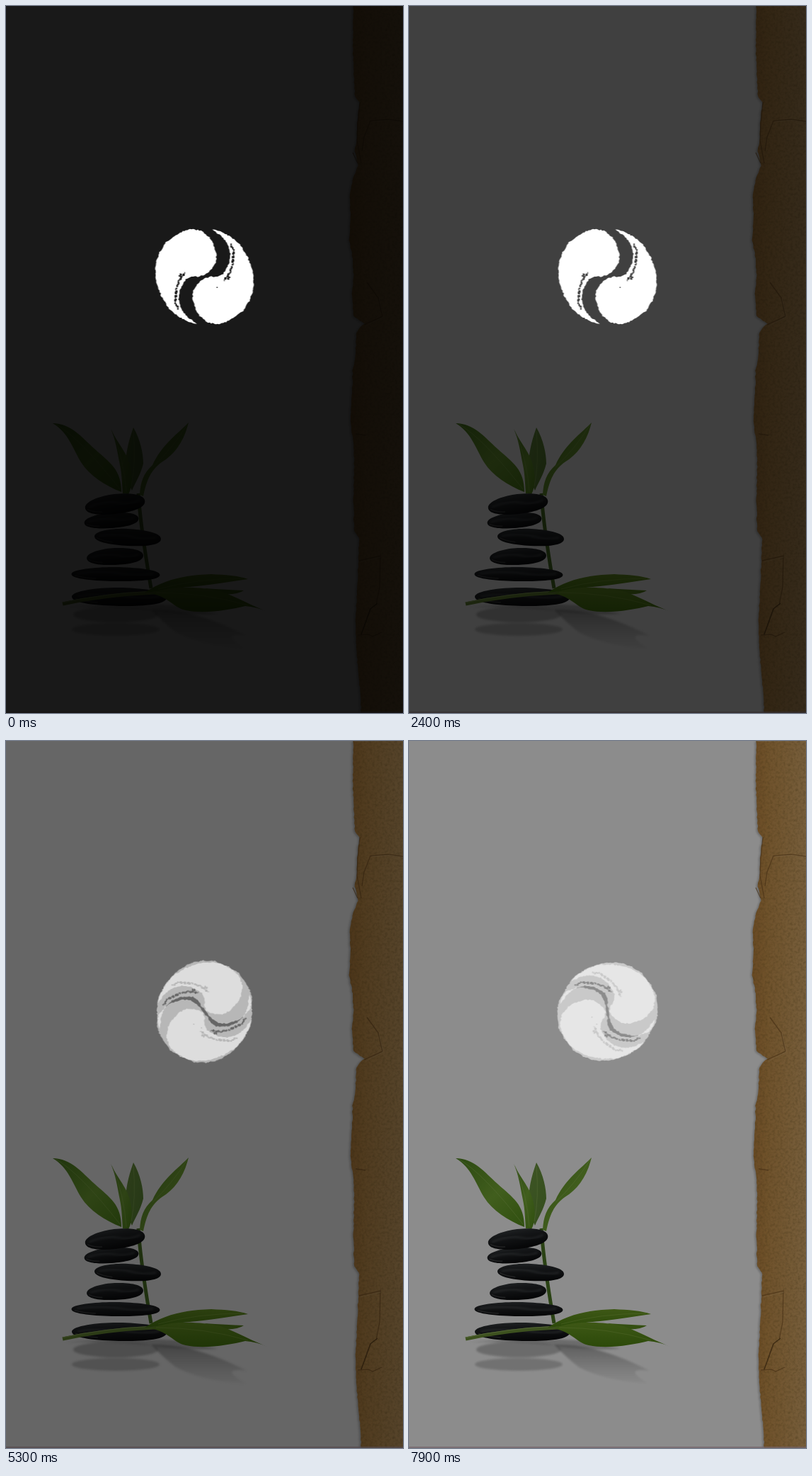
An HTML page with a canvas for the animation above (8000 ms loop, 561 px wide and 998 px high).

```html
<!DOCTYPE html>
<html lang="en">
<head>
<meta charset="utf-8">
<title>Stones and spinner</title>
<style>
  html, body { margin: 0; width: 100%; height: 100%; overflow: hidden; background: #1a1a1a; }
  #stage { position: relative; width: 561px; height: 998px; overflow: hidden; background: #fff; }
  #stage > * { position: absolute; left: 0; top: 0; display: block; }
  #dim { width: 561px; height: 998px; background: #000; opacity: .9; }
</style>
</head>
<body>
<div id="stage">
  <svg id="scene" width="561" height="998" viewBox="0 0 561 998">
    <defs>
      <linearGradient id="paperFill">
        <stop offset="0" stop-color="#bd8540"/>
        <stop offset=".3" stop-color="#cb9650"/>
        <stop offset="1" stop-color="#d8ab6c"/>
      </linearGradient>
      <linearGradient id="stoneFill" x1="0" y1="0" x2=".25" y2="1">
        <stop offset="0" stop-color="#3c4144"/>
        <stop offset=".35" stop-color="#26292c"/>
        <stop offset="1" stop-color="#0c0d0f"/>
      </linearGradient>
      <linearGradient id="leafDark" x1="0" y1="0" x2="1" y2="1">
        <stop offset="0" stop-color="#4f8420"/>
        <stop offset=".55" stop-color="#76aa35"/>
        <stop offset="1" stop-color="#568f1c"/>
      </linearGradient>
      <linearGradient id="leafLight" x1="0" y1="0" x2="1" y2="1">
        <stop offset="0" stop-color="#719a42"/>
        <stop offset="1" stop-color="#5e8c35"/>
      </linearGradient>
      <linearGradient id="leafLow" x1="0" y1="0" x2="0" y2="1">
        <stop offset="0" stop-color="#709f27"/>
        <stop offset="1" stop-color="#4f8511"/>
      </linearGradient>
      <linearGradient id="fade" x1="0" y1="0" x2="0" y2="1">
        <stop offset="0" stop-color="#777" stop-opacity=".65"/>
        <stop offset="1" stop-color="#aaa" stop-opacity=".1"/>
      </linearGradient>
      <filter id="soft"><feGaussianBlur stdDeviation="1.6"/></filter>
      <filter id="grain" x="0" y="0" width="1" height="1">
        <feTurbulence type="fractalNoise" baseFrequency=".28" numOctaves="3" seed="4"/>
        <feColorMatrix values="0 0 0 0 .2  0 0 0 0 .12  0 0 0 0 .02  .9 0 0 0 -.34"/>
        <feComposite in2="SourceAlpha" operator="in" result="dust"/>
        <feMerge><feMergeNode in="SourceGraphic"/><feMergeNode in="dust"/></feMerge>
      </filter>
    </defs>

    <path id="paperShade" fill="#777" opacity=".45" filter="url(#soft)" transform="translate(-2 1)"/>
    <path id="paper" fill="url(#paperFill)" filter="url(#grain)"/>
    <g fill="none" stroke="#7d5424" stroke-width="1.3" opacity=".65">
      <path d="M500 136L497 165 496 190 502 222M503 205L506 185 515 162 540 160 561 163"/>
      <path d="M490 207L497 222M510 390L526 412 532 438 506 450M494 604L508 606"/>
      <path d="M499 783L529 776 528 820 523 846M497 888L512 887 518 890 531 884"/>
      <path d="M525 843L515 851 502 887" stroke="#4b3010" stroke-width="1.6"/>
    </g>
    <path d="M517 163L542 161 561 164M527 413L533 439 508 452M501 785L530 778" fill="none" stroke="#e8c48c" opacity=".35"/>

    <g filter="url(#soft)">
      <ellipse cx="155" cy="859" rx="60" ry="11" fill="#888" opacity=".5"/>
      <ellipse cx="155" cy="880" rx="62" ry="9" fill="#888" opacity=".42"/>
      <path d="M85 849Q160 842 240 846L300 858Q260 860 225 856Q150 846 85 849Z" fill="#888" opacity=".5"/>
      <path d="M205 852Q265 850 340 889Q300 884 338 907Q280 904 240 884Q222 870 205 852Z" fill="url(#fade)"/>
    </g>

    <path d="M187 688Q190 735 205 822" fill="none" stroke="#4d7825" stroke-width="5"/>
    <path d="M180 595C190 612 194 632 194 646C190 662 183 672 178 684C168 662 164 640 180 595Z" fill="url(#leafLight)"/>
    <path d="M66 589C92 589 107 609 125 625C147 645 163 654 163 686C140 677 118 663 106 644C94 624 88 602 66 589Z" fill="url(#leafDark)"/>
    <path d="M148 597C160 622 174 632 177 658C179 674 176 684 173 689L165 688C164 676 164 662 161 648C157 628 155 612 148 597Z" fill="url(#leafDark)"/>
    <path d="M258 588C252 612 240 632 220 644C205 655 199 668 194 692L189 690C190 672 194 660 207 648C220 620 240 606 258 588Z" fill="url(#leafDark)"/>
    <path d="M70 590Q105 610 161 682M150 600Q167 640 170 686M180 600Q184 645 177 678M256 591Q234 626 207 651" fill="none" stroke="#a9ce6b" stroke-width=".8" opacity=".5"/>

    <g id="stones"></g>

    <path d="M80 844Q140 831 210 828L240 823" fill="none" stroke="#6f9338" stroke-width="5"/>
    <path d="M80 842Q140 829 210 826" fill="none" stroke="#98b765" stroke-width="1.2"/>
    <path d="M196 828C225 808 258 803 290 802C310 803 328 804 342 809C318 812 300 816 270 819C240 821 220 826 196 828Z" fill="url(#leafLow)"/>
    <path d="M280 822Q312 824 336 825Q326 832 304 830Z" fill="#5f8f1f"/>
    <path d="M205 829C235 817 275 820 303 826C330 836 350 848 372 856Q354 848 338 847C315 853 275 859 250 852C235 847 232 836 205 829Z" fill="url(#leafLow)"/>
    <path d="M212 828Q280 828 342 846M215 823Q270 808 335 808" fill="none" stroke="#a5c85a" stroke-width=".8" opacity=".5"/>
    <rect y="996" width="561" height="2" fill="#d2b4be" opacity=".7"/>
  </svg>
  <div id="dim"></div>
  <canvas id="mark" width="561" height="998"></canvas>
</div>

<script>
const LOOP = 8000, STEP = 100, TURN = 2400;
const CX = 280.5, CY = 382;
const $ = id => document.getElementById(id);

function seeded(seed) {
  return () => (seed = (seed * 16807) % 2147483647) / 2147483647;
}
const rand = seeded(4217);
const jitter = amount => (rand() - .5) * 2 * amount;

// Splits each segment into short pieces and nudges the new points.
function roughen(flat, piece, amount) {
  const out = [];
  for (let i = 0; i + 3 < flat.length; i += 2) {
    const [x, y, u, v] = flat.slice(i, i + 4);
    const n = Math.max(1, Math.round(Math.hypot(u - x, v - y) / piece));
    for (let k = 0; k < n; k++) {
      out.push([x + (u - x) * k / n + jitter(amount), y + (v - y) * k / n + jitter(amount)]);
    }
  }
  out.push(flat.slice(-2));
  return out;
}
const toPath = points => "M" + points.map(p => p.map(n => n.toFixed(1)).join(" ")).join("L") + "Z";

const tornEdge = [491,0, 490,60, 492,100, 493,128, 500,136, 496,165, 496,185, 493,205, 497,225,
  491,242, 486,262, 487,300, 485,330, 489,352, 491,380, 489,410, 491,438, 506,448, 495,460,
  494,490, 490,515, 489,550, 487,590, 491,615, 492,650, 491,700, 492,742, 499,750, 498,780,
  496,830, 494,870, 495,910, 499,950, 502,998];
const paper = toPath([...roughen(tornEdge, 4, .7), [561, 998], [561, 0]]);
$("paper").setAttribute("d", paper);
$("paperShade").setAttribute("d", paper);

// Stones from the bottom up: centre, radii, tilt.
const stones = [
  [160, 834, 67, 13, 1], [155, 802, 62.5, 10, 1], [154, 777, 40, 12, -2],
  [172, 750, 47, 12, 3], [149, 726, 38.5, 11, -4], [154, 703, 42.5, 14, -6]
];
$("stones").innerHTML = stones.map(([x, y, rx, ry, tilt]) => `
  <g transform="translate(${x} ${y}) rotate(${tilt})">
    <path d="M${-rx} 1C${-rx} ${-ry * .6} ${-rx * .4} ${-ry} 0 ${-ry}S${rx} ${-ry * .8} ${rx} 0S${rx * .45} ${ry} 0 ${ry}S${-rx} ${ry * .8} ${-rx} 1Z" fill="url(#stoneFill)"/>
    <path d="M${-rx * .88} ${ry * .05}Q${-rx * .3} ${-ry * .5} ${rx * .1} ${-ry * .1}T${rx * .85} ${-ry * .15}" fill="none" stroke="#878d90" stroke-width="2" opacity=".4" filter="url(#soft)"/>
    <path d="M${-rx * .93} ${ry * .25}Q${-rx * .75} ${ry * .6} ${-rx * .45} ${ry * .65}" fill="none" stroke="#777" stroke-width="1.5" opacity=".4"/>
  </g>`).join("");

// One brushed comma; the other is the same shape turned half way round.
const comma = [270,449, 255,445, 240,436, 228,424, 219,408, 213,392, 211,378, 212,362, 217,347,
  226,334, 238,325, 250,318, 262,315, 275,317, 286,325, 293,336, 297,350, 297,362, 291,371,
  283,378, 274,382, 262,382, 254,386, 249,394, 245,404, 244,414, 247,426, 255,438, 270,449];
const dryStroke = [252,377, 246,385, 241,397, 239,410, 240,420, 243,427];

function makeMark() {
  const size = 160, sprite = document.createElement("canvas");
  sprite.width = sprite.height = size;
  const c = sprite.getContext("2d");
  c.translate(size / 2, size / 2);
  const half = (outline, flecks) => {
    c.save();
    c.translate(-CX, -CY);
    c.globalCompositeOperation = "source-over";
    c.fillStyle = "#fff";
    c.fill(new Path2D(outline));
    c.globalCompositeOperation = "destination-out";
    flecks.forEach(([x, y, w, h]) => c.fillRect(x, y, w, h));
    c.restore();
  };
  const outline = toPath(roughen(comma, 2.2, .8));
  const flecks = roughen(dryStroke, 1.6, 1.1)
    .map(([x, y]) => [x - 1, y - 1, 1 + rand() * 2, 1.4 + rand() * 2]);
  for (let i = 0; i < 7; i++) flecks.push([244 + rand() * 7, 375 + rand() * 13, 2, 2]);
  half(outline, flecks);
  c.rotate(Math.PI);
  half(outline, flecks);
  c.rotate(Math.PI);
  c.globalCompositeOperation = "destination-out";
  c.fillRect(17, 14.5, 1.5, 1.5);
  return sprite;
}

const sprite = makeMark();
const ctx = $("mark").getContext("2d");

function drawPose(pose, alpha) {
  ctx.save();
  ctx.globalAlpha = alpha;
  ctx.translate(CX, CY);
  ctx.rotate((pose % 6) * Math.PI / 6);
  ctx.drawImage(sprite, -80, -80);
  ctx.restore();
}

// Six poses, 30 degrees apart; every second step mixes two neighbours.
function render(time) {
  const step = Math.floor(time / STEP), pose = step >> 1;
  ctx.clearRect(200, 300, 162, 164);
  if (step % 2) {
    drawPose(pose, .53);
    drawPose(pose + 1, .53);
  } else {
    drawPose(pose, 1);
  }
  $("dim").style.opacity = .9 - .15 * Math.floor(time / TURN);
}

const start = performance.now();
function tick() {
  render((performance.now() - start) % LOOP);
  requestAnimationFrame(tick);
}
tick();
</script>
</body>
</html>
```
